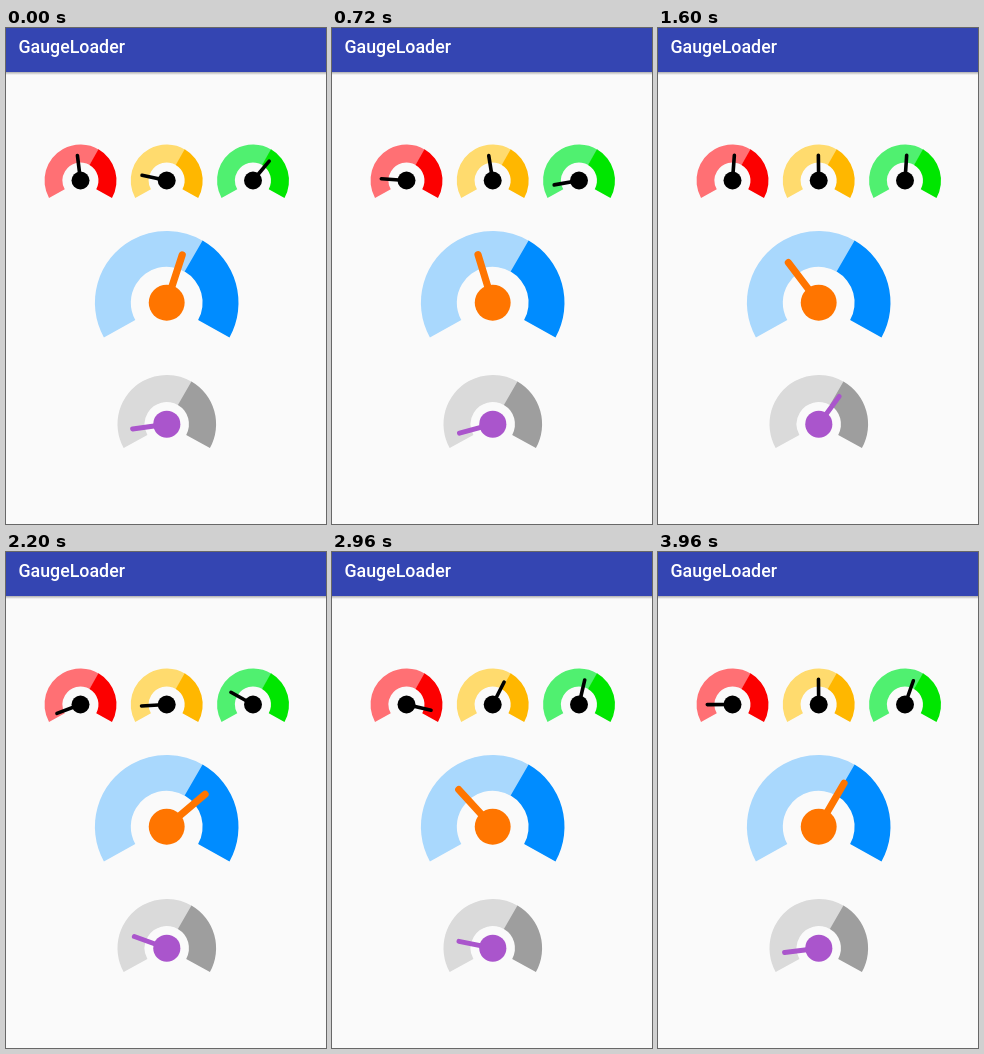
Recreate the animation shown at these times as an HTML page with a canvas. Size 320x496 px, loop 4 s.

```html
<!DOCTYPE html>
<html lang="en">
<head>
<meta charset="utf-8">
<title>GaugeLoader</title>
<style>
  html, body { margin: 0; width: 100%; height: 100%; overflow: hidden; background: #fafafa; }
  canvas { display: block; width: 320px; height: 496px; }
</style>
</head>
<body>
<canvas id="stage"></canvas>
<script>
const W = 320, H = 496, LOOP = 4000, STEP = 40;
const BEAT = LOOP / 6, LAG = BEAT / 10;
const SPAN = 119, SPLIT = 30;

const canvas = document.getElementById('stage');
const ctx = canvas.getContext('2d');
const dpr = window.devicePixelRatio || 1;
canvas.width = W * dpr;
canvas.height = H * dpr;

// Each needle swings to its next angle (degrees clockwise from up) once per beat
const base = { y: 152.5, r: 36, inner: 0.5, hub: 0.25, needle: '#000' };
const gauges = [
  { x: 74.5, low: '#ff7074', high: '#fc0000', turns: [-7, -86, 19, -118, 108, 78, -93] },
  { x: 160.7, low: '#ffdb6e', high: '#ffb700', turns: [-78, -9, 11, -98, 49, -91, 1] },
  { x: 247, low: '#50f070', high: '#00e600', turns: [40, -100, 12, -64, 30, -77, 21] },
  { x: 160.7, y: 274.7, r: 71.8, low: '#a9d8fd', high: '#008cff', needle: '#ff7500',
    turns: [18, -17, -48, 53, -48, -13, 31] },
  { x: 160.8, y: 396.2, r: 49.3, inner: 0.45, hub: 0.275,
    low: '#dadada', high: '#9e9e9e', needle: '#aa55cc',
    turns: [-98, -105, 49, -69, -107, 74, -100] }
].map(g => ({ ...base, ...g }));

const rad = deg => deg * Math.PI / 180;
const easeInOut = u => u < 0.5 ? 4 * u ** 3 : 1 - 4 * (1 - u) ** 3;

function angleAt(turns, t) {
  const beat = Math.max(0, (t - LAG) / BEAT);
  const i = Math.floor(beat);
  return turns[i] + (turns[i + 1] - turns[i]) * easeInOut(beat - i);
}

function band(g, from, to, color) {
  const a = rad(from - 90), b = rad(to - 90);
  ctx.beginPath();
  ctx.arc(g.x, g.y, g.r, a, b);
  ctx.arc(g.x, g.y, g.r * g.inner, b, a, true);
  ctx.fillStyle = color;
  ctx.fill();
}

function drawGauge(g, t) {
  band(g, -SPAN, SPLIT + 1, g.low);
  band(g, SPLIT, SPAN, g.high);

  const a = rad(angleAt(g.turns, t)), len = g.r * 0.7;
  ctx.strokeStyle = ctx.fillStyle = g.needle;
  ctx.lineWidth = g.r * 0.1;
  ctx.lineCap = 'round';
  ctx.beginPath();
  ctx.moveTo(g.x, g.y);
  ctx.lineTo(g.x + len * Math.sin(a), g.y - len * Math.cos(a));
  ctx.stroke();
  ctx.beginPath();
  ctx.arc(g.x, g.y, g.r * g.hub, 0, 2 * Math.PI);
  ctx.fill();
}

function drawHeader() {
  const shade = ctx.createLinearGradient(0, 44, 0, 47);
  shade.addColorStop(0, 'rgba(0,0,0,0.3)');
  shade.addColorStop(1, 'rgba(0,0,0,0)');
  ctx.fillStyle = shade;
  ctx.fillRect(0, 44, W, 3);
  ctx.fillStyle = '#3445b2';
  ctx.fillRect(0, 0, W, 44);
  ctx.fillStyle = '#fff';
  ctx.font = '500 17.8px Roboto, sans-serif';
  ctx.fillText('GaugeLoader', 12.5, 25);
}

function draw(t) {
  ctx.setTransform(dpr, 0, 0, dpr, 0, 0);
  ctx.fillStyle = '#fafafa';
  ctx.fillRect(0, 0, W, H);
  drawHeader();
  gauges.forEach(g => drawGauge(g, t));
}

const start = performance.now();
function tick() {
  const t = (performance.now() - start) % LOOP;
  draw(Math.floor(t / STEP) * STEP);
  requestAnimationFrame(tick);
}
tick();
</script>
</body>
</html>
```
